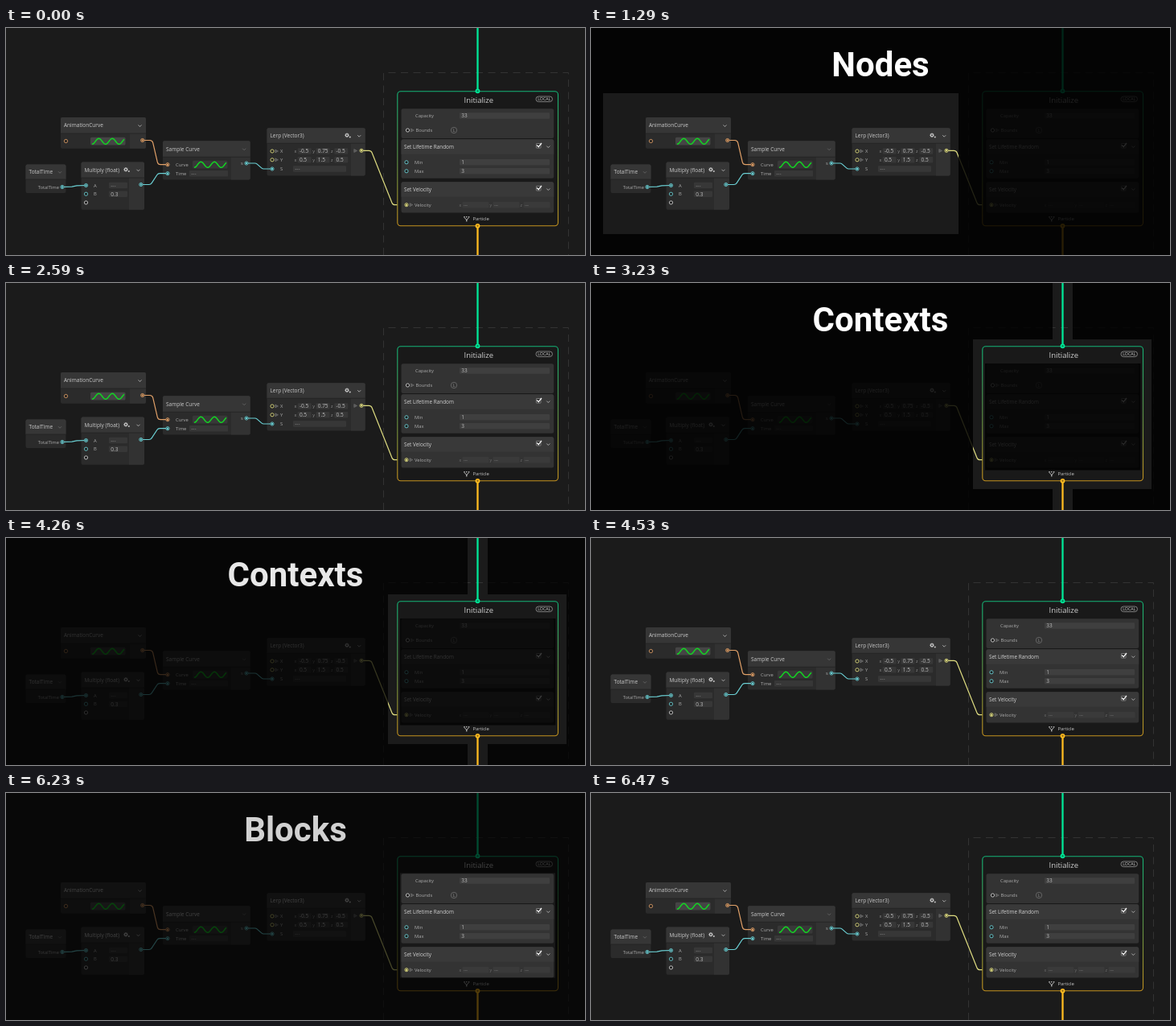
An HTML page with a canvas that plays this animation: 720 px wide and 282 px high, repeating every 6800 ms.

```html
<!DOCTYPE html>
<html lang="en">
<head>
<meta charset="utf-8">
<title>Node graph anatomy</title>
<style>
html, body { margin: 0; width: 100%; height: 100%; overflow: hidden; background: #1b1b1b; }
canvas { display: block; width: 720px; height: 282px; }
</style>
</head>
<body>
<canvas id="stage"></canvas>
<script>
const W = 720, H = 282, LOOP = 6800;
const STEP = 30, STEPS = 10;
const stage = document.getElementById('stage');
const ratio = window.devicePixelRatio || 1;
const SANS = '"Open Sans", "Noto Sans", sans-serif';
const ORANGE = '#e0a068', CYAN = '#6bd0d4', YELLOW = '#dedc80', WHITE = '#cfcfcf';
const GREEN = '#00e898', AMBER = '#ffbc20';
let g;

function layer(canvas = document.createElement('canvas')) {
  canvas.width = W * ratio;
  canvas.height = H * ratio;
  const c = canvas.getContext('2d');
  c.scale(ratio, ratio);
  return c;
}

function box(x, y, w, h, r, fill, stroke, width = 1) {
  g.beginPath();
  g.roundRect(x, y, w, h, r);
  if (fill) { g.fillStyle = fill; g.fill(); }
  if (stroke) { g.strokeStyle = stroke; g.lineWidth = width; g.stroke(); }
}

function disc(x, y, r, color) {
  g.beginPath();
  g.arc(x, y, r, 0, 7);
  g.fillStyle = color;
  g.fill();
}

function ring(x, y, r, color, width) {
  g.beginPath();
  g.arc(x, y, r, 0, 7);
  g.strokeStyle = color;
  g.lineWidth = width;
  g.stroke();
}

function line(points, color, width = 1) {
  g.beginPath();
  points.forEach(([x, y]) => g.lineTo(x, y));
  g.strokeStyle = color;
  g.lineWidth = width;
  g.stroke();
}

function text(s, x, y, size = 5.8, color = '#adadad', align = 'left') {
  g.font = `${size}px ${SANS}`;
  g.textAlign = align;
  g.fillStyle = color;
  g.fillText(s, x, y);
}

function port(x, y, color, linked) {
  disc(x, y, 2.1, '#1c1c1c');
  ring(x, y, 2.1, color, 0.9);
  if (linked) disc(x, y, 1.2, color);
}

function chevron(x, y, color = '#b4b4b4') {
  line([[x - 2, y - 1], [x, y + 1], [x + 2, y - 1]], color, 0.9);
}

function triangle(x, y) {
  g.beginPath();
  g.moveTo(x - 1.7, y - 2);
  g.lineTo(x + 2, y);
  g.lineTo(x - 1.7, y + 2);
  g.closePath();
  g.fillStyle = '#555';
  g.fill();
  g.strokeStyle = '#777';
  g.lineWidth = 0.6;
  g.stroke();
}

function gear(x, y) {
  ring(x, y, 1.6, '#c4c4c4', 1.3);
  for (let i = 0; i < 8; i++) {
    const a = i * Math.PI / 4, c = Math.cos(a), s = Math.sin(a);
    line([[x + c * 2, y + s * 2], [x + c * 2.8, y + s * 2.8]], '#c4c4c4', 0.9);
  }
  disc(x + 3.8, y + 2.3, 1, '#c4c4c4');
}

function field(x, y, w, value, fill = '#373737') {
  box(x, y - 3.8, w, 7.6, 1, fill);
  if (value) text(value, x + 2.2, y + 2.4, 6.5, value[1] === '-' ? '#858585' : '#bbb');
}

function wave(x, y, fill) {
  box(x, y - 4.8, 43.5, 9.8, 1.5, fill);
  g.beginPath();
  for (let i = 0; i <= 40; i += 0.5) {
    g.lineTo(x + 2 + i, y + 0.3 + 3.5 * Math.cos(i * Math.PI / 8.4));
  }
  g.strokeStyle = '#12d522';
  g.lineWidth = 1.5;
  g.stroke();
}

function node(title, x, y, w, h, head, split, chevronColor) {
  box(x, y, w, h, 2, '#2b2b2b');
  if (split) box(split, y + head, x + w - split, h - head, [0, 0, 2, 0], '#323232');
  box(x, y, w, head, [2, 2, 0, 0], '#363636');
  line([[x, y + head], [x + w, y + head]], '#232323', 0.8);
  text(title, x + 4, y + head / 2 + 2.4, 6.5, '#cacaca');
  chevron(x + w - 7.5, y + head / 2 + 0.5, chevronColor);
}

// Leaves and enters horizontally, with a slanted run and rounded bends between.
function wire(x1, y1, x2, y2, color) {
  const out = x1 + 12, into = x2 - 12;
  const r = Math.min(4, Math.abs(y2 - y1) / 2);
  g.beginPath();
  g.moveTo(x1, y1);
  g.arcTo(out, y1, into, y2, r);
  g.arcTo(into, y2, x2, y2, r);
  g.lineTo(x2, y2);
  g.strokeStyle = color;
  g.lineWidth = 1.2;
  g.stroke();
}

function drawNodes() {
  node('AnimationCurve', 68, 111, 106, 38.7, 20, 154);
  node('TotalTime', 24.5, 169.5, 50, 35.5, 18.5, 0, '#666');
  node('Multiply (float)', 93.5, 166.5, 78.5, 59.3, 19.5, 153);
  node('Sample Curve', 195, 140.2, 108.7, 48.3, 20, 280, '#666');
  node('Lerp (Vector3)', 324.5, 124.2, 122.2, 59.3, 19, 429);
  gear(149, 175.8);
  gear(424, 133.2);
}

function drawWires() {
  wire(170, 139.5, 201, 169.7, ORANGE);
  wire(168, 194.5, 201, 180.7, CYAN);
  wire(299, 168, 331, 175, CYAN);
  line([[70, 197.5], [82, 197.2], [88, 195.8], [99.5, 195.5]], CYAN, 1.2);
  wire(442, 152.3, 493, 219.7, YELLOW);
}

function drawRows() {
  port(74.5, 140.5, ORANGE);
  wave(105, 140.5, '#454545');
  port(169.7, 139.5, ORANGE, true);

  text('TotalTime', 66, 199.6, 5.8, '#adadad', 'right');
  port(70, 197.5, CYAN, true);

  ['A', 'B', ''].forEach((name, i) => {
    const y = 195.5 + i * 10.7;
    port(99.5, y, i < 2 ? CYAN : WHITE, i < 1);
    text(name, 109, y + 2.1);
    if (name) field(128, y, 23, i ? '0.3' : '---');
  });
  port(167.8, 194.5, CYAN, true);

  port(201, 169.7, ORANGE, true);
  text('Curve', 211, 171.9);
  wave(232, 169.5, '#383838');
  port(201, 180.7, CYAN, true);
  text('Time', 211, 182.9);
  field(228, 180.7, 48, '---');
  text('s', 292, 170.2);
  port(299, 168, CYAN, true);

  [['X', '-0.5', '0.75', '-0.5'], ['Y', '0.5', '1.5', '0.5']].forEach(([name, ...vals], i) => {
    const y = 153 + i * 10.8;
    port(331, y, YELLOW);
    triangle(336.5, y);
    text(name, 341, y + 2.1);
    vals.forEach((v, j) => {
      const x = 358.5 + j * 22.8;
      field(x + 4.2, y, 17, v);
      text('xyz'[j], x, y + 2.1, 5.5, '#909090');
    });
  });
  port(331, 175, CYAN, true);
  text('S', 341, 177.1);
  field(357, 175, 66, '---');
  triangle(434.5, 152.5);
  port(442, 152.3, YELLOW, true);
}

function check(x, y) {
  box(x - 2.8, y - 2.8, 5.6, 5.6, 0.5, '#2a2a2a', '#9a9a9a', 0.7);
  line([[x - 2, y - 0.7], [x, y + 1.4], [x + 3.8, y - 3.3]], '#f0f0f0', 1.4);
}

function block(y, h, title) {
  box(491.5, y, 189.7, h, 2.5, '#333');
  if (title) {
    box(491.5, y, 189.7, 18.5, [2.5, 2.5, 0, 0], '#393939');
    text(title, 495, y + 11.3, 6.4, '#d2d2d2');
    check(662.2, y + 8);
    chevron(674.3, y + 9.3);
  }
}

function row(name, x, y, value) {
  text(name, x, y + 2.1);
  if (value) field(564, y, 112, value, '#3f3f3f');
}

function drawContext() {
  g.setLineDash([9, 6.5]);
  line([[469.5, 282], [469.5, 55.5], [699.5, 55.5], [699.5, 282]], '#333', 1);
  g.setLineDash([]);

  const edge = g.createLinearGradient(0, 78, 0, 246);
  edge.addColorStop(0, '#12b476');
  edge.addColorStop(0.5, '#5c9448');
  edge.addColorStop(1, '#c4921e');
  box(486.8, 78.8, 199.7, 167, 4, '#191919', edge, 1.1);
  text('Initialize', 587.8, 92.9, 9.5, '#cecece', 'center');
  box(659, 85, 20.5, 6.6, 3.3, null, '#a8a8a8', 0.7);
  text('LOCAL', 669.2, 90.2, 5.2, '#cfcfcf', 'center');

  block(100.3, 36.7);
  row('Capacity', 509, 109, '33');
  port(499.5, 127, WHITE);
  triangle(505.3, 127);
  row('Bounds', 509.5, 127);
  ring(557, 127, 3.7, '#777', 0.7);
  text('L', 557, 129, 5, '#909090', 'center');

  block(138.3, 48.5, 'Set Lifetime Random');
  port(498, 166.8, CYAN);
  row('Min', 508, 166.8, '1');
  port(498, 177.8, CYAN);
  row('Max', 508, 177.8, '3');

  block(191.2, 38.3, 'Set Velocity');
  port(498, 219.7, YELLOW, true);
  triangle(503.8, 219.7);
  row('Velocity', 508, 219.7);
  for (let i = 0; i < 3; i++) {
    const x = 563.5 + i * 38;
    box(x + 4, 215.9, 33, 7.6, 1, '#3a3a3a');
    text('xyz'[i], x, 221.6, 5.2, '#707070');
    text('---', x + 5.5, 221.6, 5.2, '#858585');
  }

  // Particle glyph
  line([[570, 235.5], [572.8, 238.5], [575.6, 235.5]], WHITE, 0.9);
  line([[572.8, 238], [572.8, 240.5]], WHITE, 1.1);
  for (const x of [570, 572.8, 575.6]) disc(x, 234.7, 0.8, WHITE);
  text('Particle', 580.5, 239.4, 5.9, '#c8c8c8');

  line([[586.5, 0], [586.5, 78]], GREEN, 2.3);
  line([[586.5, 246], [586.5, 282]], AMBER, 2.3);
  for (const [y, color] of [[78.3, GREEN], [245.8, AMBER]]) {
    disc(586.5, y, 2.9, color);
    disc(586.5, y, 1.2, 'rgba(0,0,0,.4)');
  }
}

// Dark cover with even-odd holes, plus a headline.
function slide(title, holes) {
  const c = layer();
  c.beginPath();
  c.rect(0, 0, W, H);
  holes.forEach(r => c.rect(...r));
  c.fillStyle = 'rgba(0,0,0,.84)';
  c.fill('evenodd');
  c.font = 'bold 42px Roboto, sans-serif';
  c.textAlign = 'center';
  c.fillStyle = '#fff';
  c.fillText(title, 360, 59.5);
  return c.canvas;
}

const base = layer();
g = base;
g.fillStyle = '#1b1b1b';
g.fillRect(0, 0, W, H);
drawNodes();
drawWires();
drawRows();
drawContext();

const slides = [
  { on: 1020, off: 2320, art: slide('Nodes', [[15, 81, 442, 175]]) },
  { on: 2960, off: 4260, art: slide('Contexts', [
    [574, 0, 25, 70], [475, 70, 222, 186], [574, 256, 25, 26], [490, 100, 193.5, 132.5]]) },
  { on: 4900, off: 6200, art: slide('Blocks', [[490, 99.5, 193, 130]]) }
];

const ramp = dt => dt < 0 ? 0 : Math.min(1, (Math.floor(dt / STEP) + 1) / STEPS);
const screen = layer(stage);

function frame(now) {
  const t = now % LOOP;
  screen.globalAlpha = 1;
  screen.drawImage(base.canvas, 0, 0, W, H);
  for (const s of slides) {
    const a = ramp(t - s.on) - ramp(t - s.off);
    if (a <= 0) continue;
    screen.globalAlpha = a;
    screen.drawImage(s.art, 0, 0, W, H);
  }
}

const start = performance.now();
function tick() {
  frame(performance.now() - start);
  requestAnimationFrame(tick);
}
tick();
</script>
</body>
</html>
```
